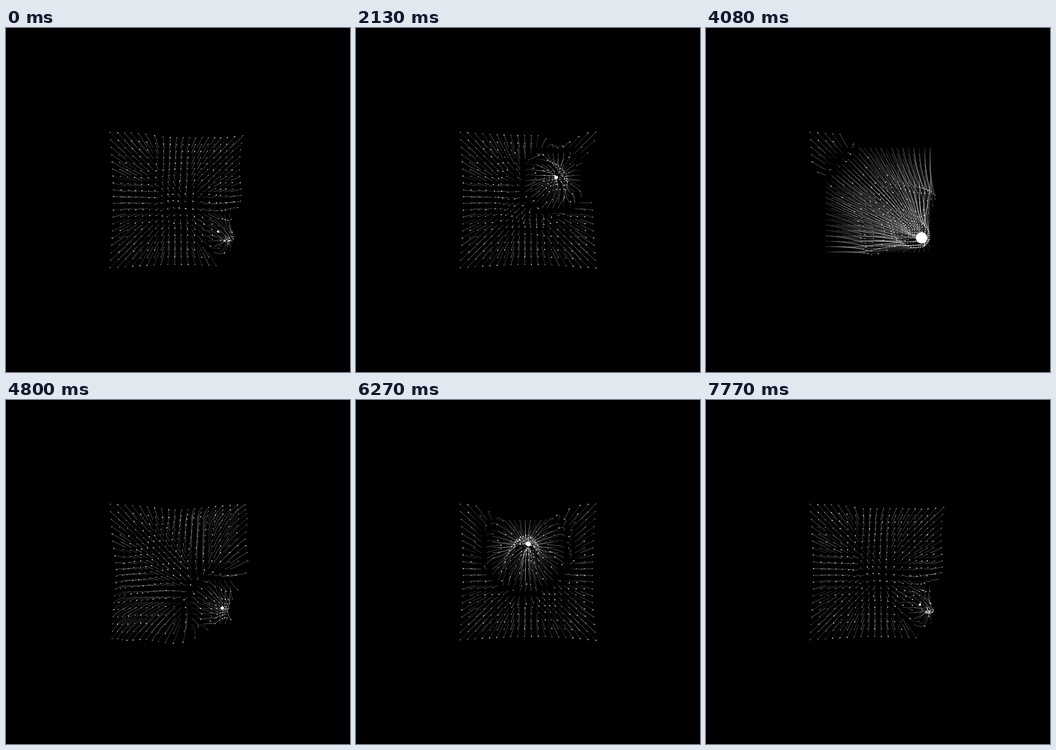
These frames come from a looping animation (600x600 px, 7.8 s). An HTML page with a canvas:

```html
<!DOCTYPE html>
<html lang="en">
<head>
<meta charset="utf-8">
<title>Hair field</title>
<style>
html, body { margin: 0; width: 100%; height: 100%; overflow: hidden; background: #000; }
canvas { display: block; width: 600px; height: 600px; }
</style>
</head>
<body>
<canvas id="stage" width="600" height="600"></canvas>
<script>
const ctx = document.getElementById('stage').getContext('2d');
const LOOP = 7800, STEP = 30, FRAMES = LOOP / STEP;
const SIDE = 20, HALF = 91, MID = 300;
const HOME_PULL = 0.06, BALL_PULL = 0.25, DRAG = 0.87, REACH = 20, TRAIL = 3;

// the ball's turning points: time, x, y, radius
const path = [
  [0, 370, 355, 2], [1230, 295, 296, 3], [2000, 345, 265, 3],
  [2800, 350, 250, 4.2], [3090, 310, 308, 3], [4080, 376, 366, 10],
  [4450, 372, 362, 4], [5150, 372, 358, 2.4], [5580, 300, 317, 2],
  [6350, 305, 245, 4.6], [6780, 370, 236, 5.4], [6930, 347, 255, 5],
  [7300, 318, 300, 2.2], [7600, 391, 363, 2.2]
];

function keyAt(i) {
  const n = path.length, turn = Math.floor(i / n);
  const [t, ...rest] = path[i - turn * n];
  return [t + turn * LOOP, ...rest];
}

// smooth periodic curve through the keys
function ballAt(t) {
  let i = path.length - 1;
  while (path[i][0] > t) i--;
  const [a, b, c, d] = [-1, 0, 1, 2].map(o => keyAt(i + o));
  const span = c[0] - b[0], u = (t - b[0]) / span;
  const value = j => {
    const m = (c[j] - a[j]) / (c[0] - a[0]) * span;
    const n = (d[j] - b[j]) / (d[0] - b[0]) * span;
    const u2 = u * u, u3 = u2 * u;
    return (2 * u3 - 3 * u2 + 1) * b[j] + (u3 - 2 * u2 + u) * m
      + (3 * u2 - 2 * u3) * c[j] + (u3 - u2) * n;
  };
  return { x: value(1), y: value(2), r: Math.max(1.8, value(3)) };
}

let seed = 7;
function random() {
  seed = (seed * 16807) % 2147483647;
  return seed / 2147483647;
}

const hairs = [];
for (let row = 0; row < SIDE; row++) {
  for (let col = 0; col < SIDE; col++) {
    const dx = (col / (SIDE - 1) * 2 - 1) * HALF;
    const dy = (row / (SIDE - 1) * 2 - 1) * HALF;
    const spread = 1 + 0.235 * Math.pow(Math.hypot(dx, dy) / HALF, 0.7);
    const hx = MID + dx * spread, hy = MID + dy * spread;
    hairs.push({
      rx: MID + dx, ry: MID + dy, hx, hy, x: hx, y: hy, vx: 0, vy: 0,
      shade: 0.2 + 0.35 * random(),
      dot: random() < 0.35 ? 1 : 0.7
    });
  }
}

function advance(ball) {
  const reach = ball.r * REACH;
  for (const h of hairs) {
    const near = 1 - Math.hypot(ball.x - h.rx, ball.y - h.ry) / reach;
    const pull = BALL_PULL * Math.max(0, near);
    h.vx = (h.vx + (h.hx - h.x) * HOME_PULL + (ball.x - h.x) * pull) * DRAG;
    h.vy = (h.vy + (h.hy - h.y) * HOME_PULL + (ball.y - h.y) * pull) * DRAG;
    h.x += h.vx;
    h.y += h.vy;
  }
}

// run two turns and keep the settled one, so the loop closes
const balls = Array.from({ length: FRAMES }, (_, i) => ballAt(i * STEP));
const tips = [];
for (let turn = 0; turn < 2; turn++) {
  balls.forEach((ball, i) => {
    advance(ball);
    tips[i] = Float32Array.from(hairs.flatMap(h => [h.x, h.y]));
  });
}

function disc(x, y, r) {
  ctx.beginPath();
  ctx.arc(x, y, r, 0, Math.PI * 2);
  ctx.fill();
}

function draw(frame) {
  const now = tips[frame], old = tips[(frame + FRAMES - TRAIL) % FRAMES];
  ctx.globalAlpha = 1;
  ctx.fillStyle = '#000';
  ctx.fillRect(0, 0, 600, 600);
  ctx.fillStyle = ctx.strokeStyle = '#fff';
  ctx.lineWidth = 0.7;
  hairs.forEach((h, i) => {
    const x = now[2 * i], y = now[2 * i + 1];
    ctx.globalAlpha = h.shade;
    ctx.beginPath();
    ctx.moveTo(h.rx, h.ry);
    ctx.quadraticCurveTo((h.rx + old[2 * i]) / 2, (h.ry + old[2 * i + 1]) / 2, x, y);
    ctx.stroke();
    ctx.globalAlpha = 0.9;
    disc(x, y, h.dot);
  });
  ctx.globalAlpha = 1;
  const ball = balls[frame];
  disc(ball.x, ball.y, ball.r);
}

const start = performance.now();
function tick() {
  const t = (performance.now() - start) % LOOP;
  draw(Math.floor(t / STEP) % FRAMES);
  requestAnimationFrame(tick);
}
tick();
</script>
</body>
</html>
```
